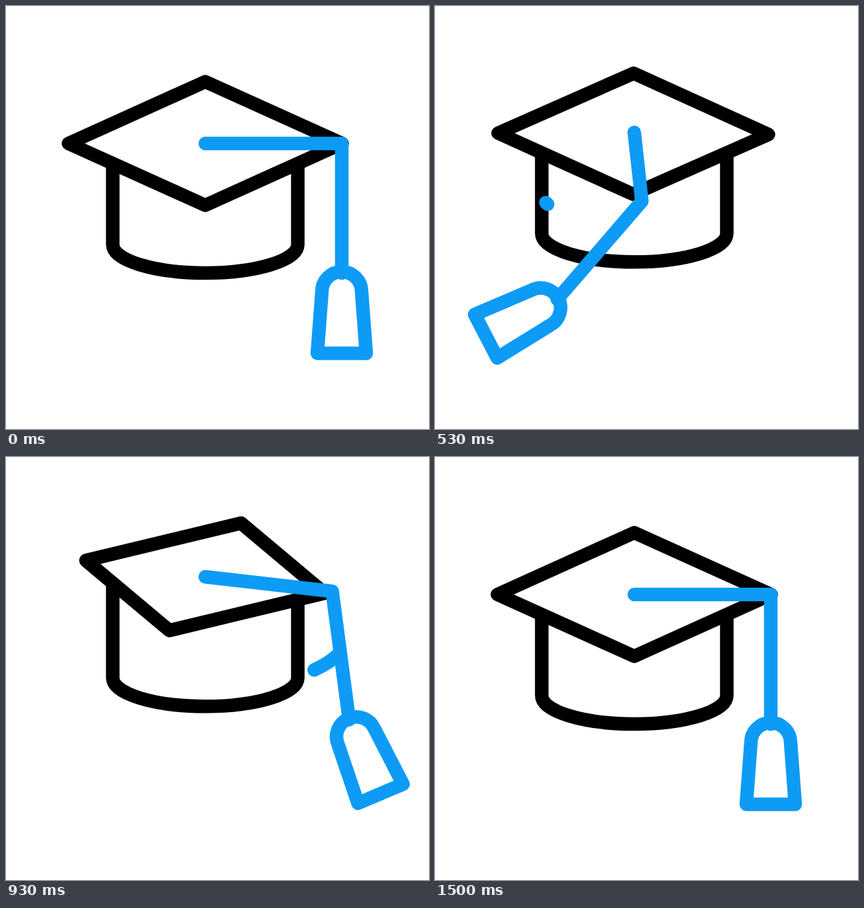
An HTML page that plays this animation: 640 by 640 pixels, repeating every 1670 ms.

```html
<!DOCTYPE html>
<html>
<head>
<meta charset="utf-8">
<style>
  html, body { margin: 0; width: 100%; height: 100%; overflow: hidden; background: #fff; }
  svg { display: block; width: 100%; height: 100%; fill: none; stroke: #000; stroke-width: 20.5; stroke-linejoin: round; }
  .blue { stroke: #0e9bf5; stroke-linecap: round; }
</style>
</head>
<body>
<svg viewBox="0 0 640 640">
  <g id="cap">
    <path d="M-140 0V153A140 43 0 0 0 140 153V0"/>
    <path id="board" fill="#fff"/>
  </g>
  <g class="blue">
    <path id="streak"/>
    <path id="cord"/>
    <path id="tassel" d="M-37 121.5L-30 28A30 30 0 0 1 30 28L37 121.5Z"/>
  </g>
</svg>
<script>
const LOOP = 1670, LAST = 45, CENTER_X = 301.5, CENTER_Y = 208, CORD = 196;
const $ = id => document.getElementById(id);

// Key rows are [frame, value, ...]
const lift = [[0, 0], [8.7, -54.5], [20, -1.5], [32.5, -37.3], [45, 0]];
// Two neighbouring board corners, then the shift of the board's middle
const boardKeys = [
  [0, 0, -93.5, -207, 0, 0, 0],
  [5, 72.5, -77, -171.5, -33, 0, 0],
  [8, 147, -60, -136, -67, 0, 0],
  [11, 177.5, -34, -81, -79, 0, 0],
  [16, 204.5, 1, 0.5, -91.5, -1.5, 2],
  [23, 151.5, -58, -130.5, -68, 0, 0],
  [27, 72.5, -77, -171.5, -33, 0, 0],
  [32, 0, -93.5, -207, 0, 0, 0]
];
// Cord bend x, y
const bendKeys = [[0, 206.5, 0], [5, 183.5, 26], [11, 77.5, 91], [16, 11.5, 104],
  [23, 136.5, 72], [27, 186, 30], [32, 206.5, 0]];
// Swing of cord and tassel in degrees, positive to the right
const swingKeys = [[0, 0, 0], [4, 4.7, 22], [5, 4.8, 22.7], [11, -21.6, -7.7],
  [16, -40.8, -62.6], [23, -5.6, -17.2], [28, 7.5, 23], [32, 0, 0]];
const streaks = [
  { x: 302, y: 221, rx: 195, ry: 87, from: 0.45, to: 2.697, head: [0, 10], tail: [2, 15.5] },
  { x: 336, y: 259, rx: 187, ry: 88, from: 2.69, to: 0.45, head: [15, 29], tail: [16, 32] }
];

// Monotone cubic interpolation through the key rows
function track(keys, f) {
  const n = keys.length - 1;
  if (f >= keys[n][0]) return keys[n].slice(1);
  const i = keys.findIndex((key, k) => f < keys[k + 1][0]);
  const span = keys[i + 1][0] - keys[i][0], u = (f - keys[i][0]) / span;
  return keys[i].slice(1).map((_, c) => {
    const slope = k => (keys[k + 1][c + 1] - keys[k][c + 1]) / (keys[k + 1][0] - keys[k][0]);
    const tangent = k => {
      if (k === 0 || k === n) return 0;
      const a = slope(k - 1), b = slope(k);
      return a * b > 0 ? 2 * a * b / (a + b) : 0;
    };
    const p = keys[i][c + 1], q = keys[i + 1][c + 1], v = 1 - u;
    return p * v * v * (1 + 2 * u) + q * u * u * (3 - 2 * u)
      + span * u * v * (tangent(i) * v - tangent(i + 1) * u);
  });
}

function ease(f, [start, end]) {
  const u = Math.min(1, Math.max(0, (f - start) / (end - start)));
  return u * u * (3 - 2 * u);
}

function streakPath(f) {
  return streaks.map(s => {
    const head = ease(f, s.head), tail = ease(f, s.tail);
    if (head - tail < 0.001) return '';
    const point = k => {
      const a = s.from + (s.to - s.from) * k;
      return `${s.x + s.rx * Math.cos(a)} ${s.y + s.ry * Math.sin(a)}`;
    };
    return `M${point(tail)}A${s.rx} ${s.ry} 0 0 ${s.to > s.from ? 1 : 0} ${point(head)}`;
  }).join('');
}

function draw(f) {
  const y = CENTER_Y + track(lift, f)[0];
  const [ax, ay, bx, by, dx, dy] = track(boardKeys, f);
  const [cx, cy] = track(bendKeys, f);
  const [cordAngle, tasselAngle] = track(swingKeys, f);
  const rad = cordAngle * Math.PI / 180;
  const bendX = CENTER_X + cx, bendY = y + cy;
  const endX = bendX + CORD * Math.sin(rad), endY = bendY + CORD * Math.cos(rad);

  $('cap').setAttribute('transform', `translate(${CENTER_X} ${y})`);
  $('board').setAttribute('d', `M${dx + ax} ${dy + ay}L${dx - bx} ${dy - by}L${dx - ax} ${dy - ay}L${dx + bx} ${dy + by}Z`);
  $('streak').setAttribute('d', streakPath(f));
  $('cord').setAttribute('d', `M${CENTER_X} ${y}L${bendX} ${bendY}L${endX} ${endY}`);
  $('tassel').setAttribute('transform', `translate(${endX} ${endY}) rotate(${-tasselAngle})`);
}

// 30 drawings per second, then a short rest
function tick() {
  const t = performance.now() % LOOP;
  draw(Math.min(LAST, Math.floor((t + 3.4) * 0.03)));
  requestAnimationFrame(tick);
}
tick();
</script>
</body>
</html>
```
